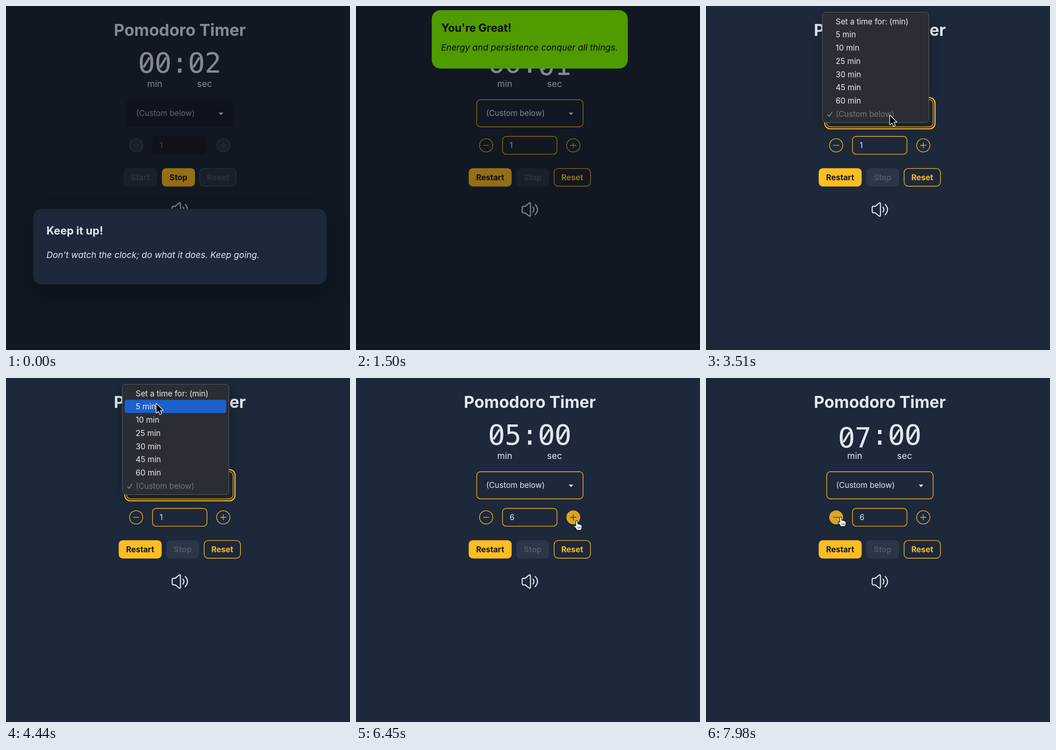
An HTML page with a canvas for the animation above (8 s loop, 748 by 748 pixels).

```html
<!DOCTYPE html>
<html lang="en">
<head>
<meta charset="utf-8">
<title>Pomodoro Timer</title>
<style>
  html, body { margin: 0; width: 100%; height: 100%; overflow: hidden; background: #1d283a; }
  canvas { display: block; }
</style>
</head>
<body>
<canvas id="stage" width="748" height="748"></canvas>
<script>
const ctx = document.getElementById('stage').getContext('2d');
const LOOP = 8000;
const BASE = '#1d283a', INK = '#e2e8f0', AMBER = '#fdbd23', HOVER = '#dba521';
const OFF_FILL = '#2b3647', OFF_INK = '#4d5764';

// Moments of the story, in ms
const DONE = 1250, TOAST_CLOSE = 2790, MENU_OPEN = 3450, MENU_PICK = 4740, MENU_FADE = 4860;
const PICKED = 5070, PLUS = 6340;

// Counter changes: [time, from, to]
const MINUTES = [[PICKED, 0, 5], [PLUS, 5, 6], [6640, 5.05, 7], [7595, 7, 6]];
const SECONDS = [[295, 2, 1], [1130, 1, 0]];

// Pointer stops: [time, x, y]
const POINTER = [
  [1690, 556, 775], [2200, 569, 276], [2790, 569, 276], [3330, 400, 238], [3580, 400, 238],
  [4080, 321, 50], [4230, 321, 50], [4440, 327, 56], [4740, 327, 56], [5100, 330, 62],
  [5180, 330, 62], [6240, 480, 311], [7080, 480, 311], [7480, 293, 303]
];
const MENU = ['Set a time for: (min)', '5 min', '10 min', '25 min', '30 min', '45 min', '60 min', '(Custom below)'];
const ROW = 28.7;

const clamp = v => Math.max(0, Math.min(1, v));
const within = (x, y, l, t, r, b) => x >= l && x <= r && y >= t && y <= b;

// cubic-bezier(1, 0, 0, 1)
function snapEase(x) {
  let lo = 0, hi = 1;
  for (let i = 0; i < 20; i++) {
    const u = (lo + hi) / 2;
    if (3 * u * (1 - u) ** 2 + u ** 3 < x) lo = u; else hi = u;
  }
  return 3 * (1 - lo) * lo * lo + lo ** 3;
}

const latest = (changes, t) => changes.filter(c => c[0] <= t).pop();

function counterAt(changes, t) {
  const [start, from, to] = latest(changes, t) || [0, changes[0][1], changes[0][1]];
  return from + (to - from) * snapEase(clamp((t - start) / 1000));
}

function pointerAt(t) {
  const i = POINTER.findIndex(p => p[0] > t);
  if (i === 0) return null;
  if (i < 0) return POINTER[POINTER.length - 1].slice(1);
  const [t0, x0, y0] = POINTER[i - 1], [t1, x1, y1] = POINTER[i];
  const k = (t - t0) / (t1 - t0), e = k * k * (3 - 2 * k);
  return [x0 + (x1 - x0) * e, y0 + (y1 - y0) * e];
}

function text(str, x, y, size, color = INK, style = '', align = 'left') {
  ctx.font = `${style} ${size}px Inter, sans-serif`;
  ctx.textAlign = align;
  ctx.fillStyle = color;
  ctx.fillText(str, x, y);
}

function box(l, t, r, b, radius, fill, stroke, width = 1.4) {
  ctx.beginPath();
  ctx.roundRect(l, t, r - l, b - t, radius);
  paint(fill, stroke, width);
}

function paint(fill, stroke, width, path) {
  const args = path ? [path] : [];
  if (fill) { ctx.fillStyle = fill; ctx.fill(...args); }
  if (stroke) { ctx.strokeStyle = stroke; ctx.lineWidth = width; ctx.stroke(...args); }
}

const line = (d, color, width) => paint(null, color, width, new Path2D(d));

function layer(alpha, draw) {
  if (alpha <= 0) return;
  ctx.save();
  ctx.globalAlpha = alpha;
  draw();
  ctx.restore();
}

function glyphs(str, x, y) {
  ctx.font = '60px "DejaVu Sans Mono", monospace';
  ctx.textAlign = 'left';
  ctx.fillStyle = INK;
  [...str].forEach((ch, i) => {
    const left = x + i * 36.12;
    ctx.fillText(ch === '0' ? 'O' : ch, left, y);
    if (ch === '0') line(`M${left + 11.5} ${y - 11.5}L${left + 24.5} ${y - 33}`, INK, 4.6);
  });
}

// Two digits on a strip that scrolls behind a one-line window
function counter(value, x) {
  ctx.save();
  ctx.beginPath();
  ctx.rect(x, 93, 73, 61);
  ctx.clip();
  for (let n = Math.floor(value); n <= Math.ceil(value); n++)
    glyphs(String(n).padStart(2, '0'), x, 145 + (n - value) * 60);
  ctx.restore();
}

function button(label, l, r, look) {
  const [fill, stroke, ink] = {
    solid: [AMBER, null, '#12151a'],
    outline: [null, AMBER, AMBER],
    off: [OFF_FILL, null, OFF_INK],
    offOutline: [OFF_FILL, '#485260', OFF_INK]
  }[look];
  const inset = stroke ? 0.7 : 0;
  box(l + inset, 352.7 + inset, r - inset, 392.5 - inset, 9, fill, stroke);
  text(label, (l + r) / 2, 379, 17.2, ink, 'bold', 'center');
}

function roundButton(x, plus, running, hover) {
  const ink = running ? OFF_INK : hover ? '#2b2a26' : AMBER;
  ctx.beginPath();
  ctx.arc(x, 303, 14.4, 0, 7);
  paint(running ? OFF_FILL : hover ? HOVER : null, running ? '#485260' : hover ? HOVER : AMBER, 1.4);
  line(`M${x - 6.5} 303h13` + (plus ? `M${x} 296.5v13` : ''), ink, 1.3);
}

function page(t, pointer) {
  const running = t < DONE, ringed = t >= MENU_OPEN && t < PLUS;
  const near = x => pointer && Math.hypot(pointer[0] - x, pointer[1] - 303) < 15;
  const minute = latest(MINUTES, t);

  text('Pomodoro Timer', 378, 65, 35.4, INK, 'bold', 'center');
  counter(counterAt(MINUTES, t), 287.5);
  glyphs(':', 359.7, 145);
  counter(counterAt(SECONDS, t), 395.9);
  text('min', 323.5, 176, 19.3, INK, '', 'center');
  text('sec', 431.7, 176, 19.3, INK, '', 'center');

  if (running) box(262, 203, 494, 263, 8, '#172031');
  else box(262.5, 203.8, 493.7, 262.7, 8, null, AMBER);
  if (ringed) box(258.2, 199.4, 498, 267, 12, null, AMBER, 2.6);
  text(t >= PICKED && t < PLUS ? '5 min' : '(Custom below)', 283, 239, 17, running ? '#a9b0bb' : INK);
  paint(INK, null, 0, new Path2D('M462.5 231.8h10l-5 5.4z'));

  roundButton(283, false, running, near(283));
  if (running) box(318, 283, 437.5, 323, 8, '#191f28');
  else box(318.6, 283.5, 437, 322.4, 8, null, AMBER);
  text(minute ? minute[2] : 1, 334, 309, 17, running ? '#737a85' : INK);
  roundButton(472.5, true, running, near(472.5));

  if (running) {
    button('Start', 255, 329, 'off');
    button('Stop', 339, 411, 'solid');
    button('Reset', 420.5, 501, 'offOutline');
  } else {
    button('Restart', 245, 338.5, 'solid');
    button('Stop', 348.5, 420, 'off');
    button('Reset', 430, 510.5, 'outline');
  }

  ctx.lineJoin = ctx.lineCap = 'round';
  line('M368 435.5L376 428.8Q379.3 426.6 379.3 430.5V454.5Q379.3 458.6 376 456.3L368 449.8H364.5' +
    'Q361.3 449.8 361.3 446.5V438.7Q361.3 435.5 364.5 435.5Z' +
    'M384.8 437.3Q389 442.6 384.8 448M389.6 431.6Q399.6 442.6 389.6 453.8', INK, 2.3);
  ctx.lineCap = 'butt';
}

function modal() {
  ctx.save();
  ctx.shadowColor = 'rgba(0,0,10,.25)';
  ctx.shadowBlur = 50;
  ctx.shadowOffsetY = 25;
  box(59, 441, 697, 605, 18, BASE);
  ctx.restore();
  text('Keep it up!', 88, 497, 23.7, INK, 'bold');
  text('Don’t watch the clock; do what it does. Keep going.', 88, 547.8, 19, INK, 'italic');
}

function toast() {
  box(164.7, 9, 591, 136, 19, '#509b00');
  text("You're Great!", 185.5, 56.3, 23.7, '#050a00', 'bold');
  text('Energy and persistence conquer all things.', 185, 97, 19, '#050a00', 'italic');
}

function menu(t, pointer) {
  ctx.save();
  ctx.shadowColor = 'rgba(0,0,0,.3)';
  ctx.shadowBlur = 22;
  ctx.shadowOffsetY = 6;
  box(253, 13.5, 484.5, 253.5, 7, '#2a2e34');
  ctx.restore();
  box(253, 13.5, 484.5, 253.5, 7, null, '#5b5f65', 1);
  const row = Math.floor((pointer[1] - 19) / ROW);
  const blink = t >= MENU_PICK && t < MENU_PICK + 60;
  if (row < 7 && !blink) box(258, 18.7 + row * ROW, 479, 47.4 + row * ROW, 5, '#1d60cb');
  MENU.forEach((label, i) => text(label, 282, 39.7 + i * ROW, 17, i < 7 ? '#eceded' : '#74777c'));
  line('M264 235.5l3.6 4.5l7-10', '#85888d', 1.7);
}

const SHAPES = {
  arrow: new Path2D('M0 0V19.5L4.6 15.4L7.8 22.8L11 21.4L7.9 14.2H14Z'),
  hand: new Path2D('M-2 1.6Q-2-.8 0-.8Q2-.8 2 1.6V6.5Q4.2 5 5 7.2Q7.4 6 8.1 8.4Q11 7.6 11 10.5V14Q11 17 9 19.8H0' +
    'Q-1 16.6-4 13.8Q-7 10.8-5.5 9.6Q-4 8.8-2 11.2Z'),
  beam: new Path2D('M-4-9Q0-9 0-6.5Q0-9 4-9M0-6.5V6.5M-4 9Q0 9 0 6.5Q0 9 4 9M-2.5 3H2.5')
};

function cursorKind(x, y, menuOpen) {
  if (menuOpen) return 'arrow';
  if (within(x, y, 262, 203, 494, 263) || within(x, y, 268, 288, 298, 318) || within(x, y, 458, 288, 487, 318)) return 'hand';
  if (within(x, y, 235, 35, 521, 180) || within(x, y, 318, 283, 437, 323)) return 'beam';
  return 'arrow';
}

function cursor(x, y, kind) {
  const shape = SHAPES[kind];
  ctx.save();
  ctx.translate(x, y);
  if (kind === 'beam') {
    paint(null, '#fff', 3.6, shape);
    paint(null, '#000', 1.5, shape);
  } else if (kind === 'hand') {
    paint('#fff', '#10151d', 1.2, shape);
    line('M2.2 12.5V16.5M5 12.5V16.5M7.8 12.5V16.5', '#10151d', 1);
  } else {
    paint(null, '#fff', 2.6, shape);
    paint('#000', null, 0, shape);
  }
  ctx.restore();
}

function render(t) {
  const pointer = pointerAt(t);
  const menuOpen = t >= MENU_OPEN && t < PICKED;
  ctx.fillStyle = BASE;
  ctx.fillRect(0, 0, 748, 748);
  page(t, pointer);
  if (t < TOAST_CLOSE) {
    ctx.fillStyle = 'rgba(0,2,0,.41)';
    ctx.fillRect(0, 0, 748, 748);
  }
  layer(1 - clamp((t - DONE) / 200), modal);
  layer(t < TOAST_CLOSE ? clamp((t - DONE) / 200) : 0.82 * (1 - clamp((t - TOAST_CLOSE) / 170)), toast);
  if (menuOpen) layer(1 - clamp((t - MENU_FADE) / 200), () => menu(t, pointer));
  if (pointer) cursor(...pointer, cursorKind(...pointer, menuOpen));
}

function tick() {
  render(performance.now() % LOOP);
  requestAnimationFrame(tick);
}
tick();
</script>
</body>
</html>
```
